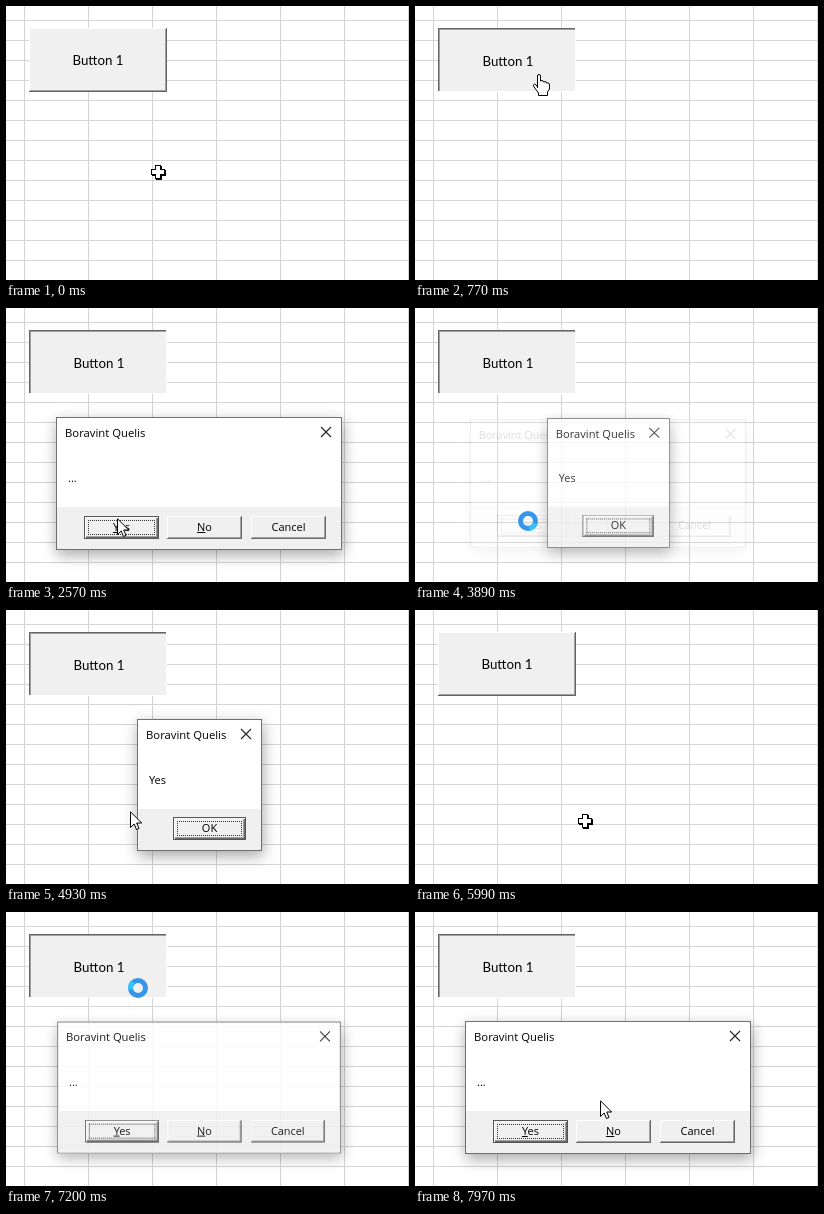
Write an HTML page that moves like this. It is 403x274 px and loops after 8000 ms.

```html
<!DOCTYPE html>
<html lang="en">
<head>
<meta charset="utf-8">
<title>Message box</title>
<style>
html, body { margin: 0; width: 100%; height: 100%; overflow: hidden; }
body {
  position: relative;
  background: #fff linear-gradient(90deg, #d4d4d4 1px, #0000 1px) 18px 14px / 64px 20px;
  background-image: linear-gradient(90deg, #d4d4d4 1px, #0000 1px), linear-gradient(#d4d4d4 1px, #0000 1px);
  color: #000;
  font: 11px/16px "Open Sans", "Noto Sans", sans-serif;
  white-space: nowrap;
  cursor: default;
}
div, svg { position: absolute; box-sizing: border-box; }
svg { overflow: visible; }

#macro {
  left: 23px; top: 22px; width: 138px; height: 64px;
  background: #f0f0f0;
  box-shadow: inset -1px -1px #646464, inset 1px 1px #fff, inset -2px -2px #a0a0a0;
  font: 13.3px/64px Lato, sans-serif;
  text-align: center;
}
#macro.sunk {
  box-shadow: inset -1px -1px #fff, inset 1px 1px #646464, inset 2px 2px #a0a0a0;
  padding: 1px 0 0 2px;
}

.dialog {
  top: 109px;
  background: #fff;
  border: 1px solid #707070;
  box-shadow: 1px 5px 14px rgba(0, 0, 0, .35);
}
#ask { left: 50px; width: 286px; height: 133px; }
#reply { left: 131px; width: 125px; height: 132px; }
.title { left: 8px; top: 7px; font-size: 11.3px; }
.close { right: 10px; top: 9px; }
.text { left: 11px; top: 52px; }
.footer { left: 0; right: 0; top: 89px; bottom: 0; background: #f0f0f0; }

.button {
  top: 98px; width: 75px; height: 23px;
  background: #f0f0f0;
  box-shadow: inset -1px -1px #696969, inset 1px 1px #fff, inset -2px -2px #a0a0a0;
  line-height: 22px;
  text-align: center;
}
.default {
  box-shadow: inset 0 0 0 1px #555, inset 2px 2px #fff, inset -2px -2px #696969, inset -3px -3px #a0a0a0;
}
.default::after {
  content: ""; position: absolute; inset: 4px;
  border: 1px dotted #333;
}
.default.down { box-shadow: inset 0 0 0 1px #555, inset 0 0 0 2px #a0a0a0; padding: 1px 0 0 2px; }
</style>
</head>
<body>
<div id="macro">Button 1</div>

<div id="ask" class="dialog">
  <div class="title">Boravint Quelis</div>
  <svg class="close" width="10" height="10"><path d="M0 0L10 10M10 0L0 10" stroke="#222" stroke-width="1.1"/></svg>
  <div class="text">...</div>
  <div class="footer"></div>
  <div id="yes" class="button default" style="left:27px"><u>Y</u>es</div>
  <div class="button" style="left:110px"><u>N</u>o</div>
  <div class="button" style="left:194px">Cancel</div>
</div>

<div id="reply" class="dialog">
  <div class="title">Boravint Quelis</div>
  <svg class="close" width="10" height="10"><path d="M0 0L10 10M10 0L0 10" stroke="#222" stroke-width="1.1"/></svg>
  <div class="text">Yes</div>
  <div class="footer"></div>
  <div id="ok" class="button default" style="left:35px;top:97px;width:73px">OK</div>
</div>

<svg id="cursor" width="1" height="1" style="left:0;top:0">
  <g id="cross">
    <path d="M-2-6H4V-2H8V4H4V8H-2V4H-6V-2H-2Z" fill="#000"/>
    <path d="M-3-7H3V-3H7V3H3V7H-3V3H-7V-3H-3Z" fill="#000"/>
    <path d="M-2-6H2V-2H6V2H2V6H-2V2H-6V-2H-2Z" fill="#fff"/>
  </g>
  <path id="hand" fill="#fff" stroke="#000" stroke-linejoin="round"
    d="M-1.5 14V2Q-1.5 .5 0 .5T1.5 2V7Q4.5 5.500 4.500 8Q7.500 6.500 7.500 9Q10.500 8 10.500 11V15L8.500 18V21.500H-.5V19L-5 13Q-6.500 10.500-4.500 10Q-3 10-1.500 13"/>
  <path id="arrow" fill="#fff" stroke="#000" d="M.5 .8V16.500L4.200 13L6.500 18.500L9 17.400L6.700 12H11.700Z"/>
  <g id="spinner" fill="none" stroke-width="5">
    <circle r="7.500" stroke="#3697ea"/>
    <path id="glow" d="M6.500-3.750A7.500 7.500 0 0 1 6.500 3.750" stroke="#35c4fa"/>
  </g>
</svg>

<script>
const LOOP = 8000;
const $ = id => document.getElementById(id);

// Pointer stops: time, x, y
const path = [
  [0, 152, 166], [20, 152, 166], [590, 124, 68], [1300, 124, 68],
  [1555, 118, 110], [2380, 111, 206], [2570, 111, 210], [2990, 113, 220],
  [3289, 113, 220], [3290, 113, 221], [3600, 113, 221], [3740, 113, 213],
  [3900, 113, 213], [4280, 113, 198], [4740, 113, 198], [5540, 171, 214],
  [5590, 171, 214], [5800, 170, 211], [6000, 170, 211], [6680, 132, 76],
  [7270, 132, 76], [7970, 185, 188], [LOOP, 185, 188]
];

// Pointer shape from the given time on
const shapes = [
  [0, "cross"], [400, "hand"], [1000, "spinner"], [1300, "arrow"],
  [3770, "spinner"], [4740, "arrow"], [5780, "cross"], [6560, "hand"],
  [6990, "spinner"], [7270, "arrow"]
];

const clamp = v => Math.min(1, Math.max(0, v));
const within = (t, from, to) => t >= from && t < to;

function pointerAt(t) {
  const i = path.findIndex(stop => stop[0] > t);
  const [t0, x0, y0] = path[i - 1], [t1, x1, y1] = path[i];
  const p = (t - t0) / (t1 - t0);
  const k = (p + p * p * (3 - 2 * p)) / 2;
  return [Math.round(x0 + (x1 - x0) * k), Math.round(y0 + (y1 - y0) * k)];
}

function showDialog(id, t, opens, closes) {
  const opened = 1 - (1 - clamp((t - opens) / 240)) ** 3;
  const closed = clamp((t - closes) / 150);
  const scale = 0.9 + 0.1 * opened - 0.04 * closed;
  const style = $(id).style;
  style.opacity = opened ** 1.5 * (1 - closed);
  style.transform = scale === 1 ? "none" : `scale(${scale})`;
}

function draw(t) {
  $("macro").classList.toggle("sunk", within(t, 770, 5780) || t >= 6760);
  $("yes").classList.toggle("down", within(t, 3640, 3760));
  $("ok").classList.toggle("down", within(t, 5610, 5720));

  if (t < 6500) showDialog("ask", t, 1075, 3760);
  else showDialog("ask", t, 7065, Infinity);
  showDialog("reply", t, 3780, 5730);

  const [x, y] = pointerAt(t);
  $("cursor").style.transform = `translate(${x}px, ${y}px)`;
  const current = shapes.findLast(([from]) => from <= t)[1];
  for (const name of ["cross", "hand", "arrow", "spinner"])
    $(name).style.display = name === current ? "" : "none";
  const step = Math.floor((t - 30) / 250);
  $("glow").setAttribute("transform", `rotate(${200 + (step - 4) * 150})`);
}

function frame() {
  draw(performance.now() % LOOP);
  requestAnimationFrame(frame);
}
frame();
</script>
</body>
</html>
```
